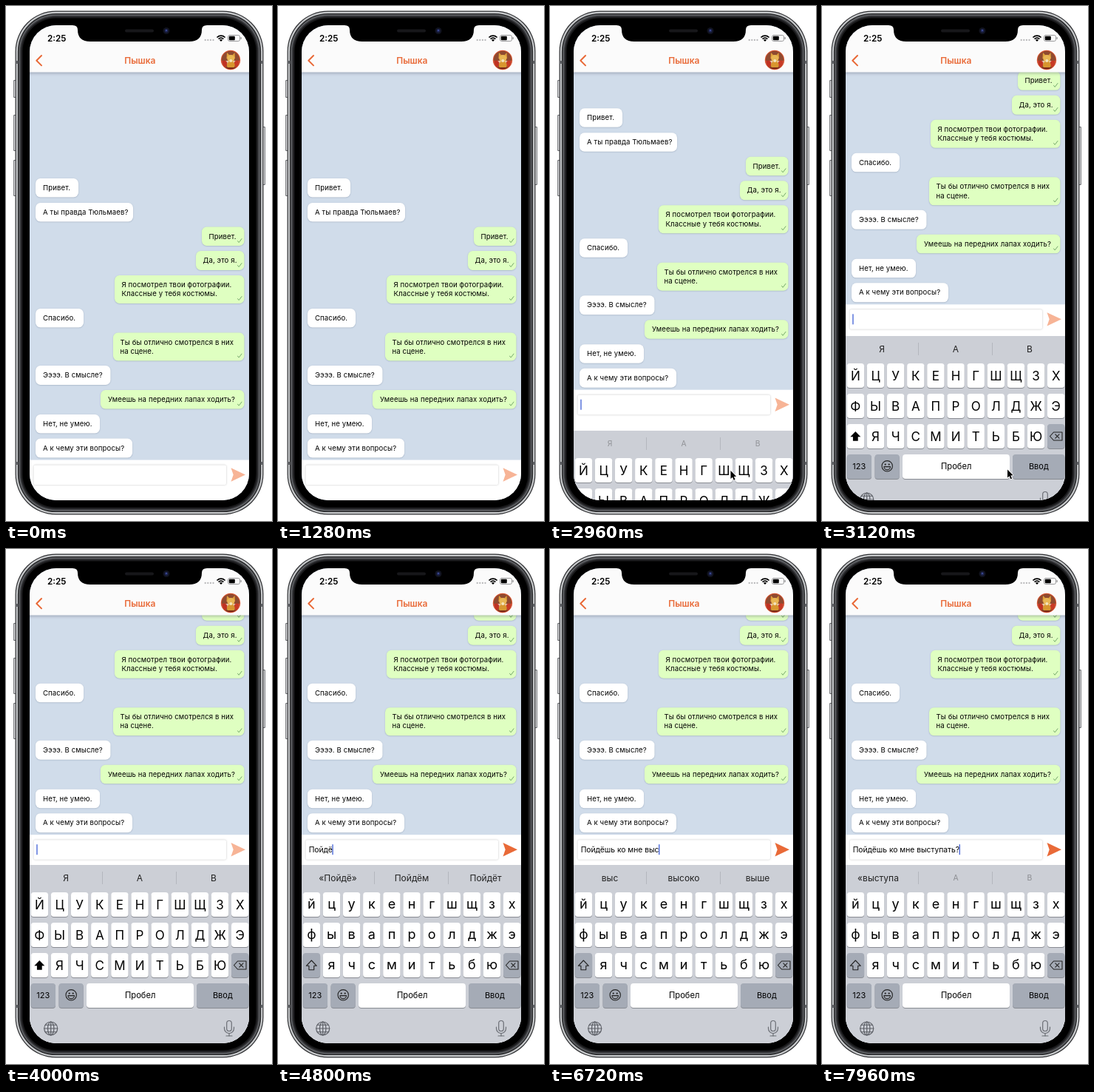
These frames come from a looping animation (360x696 px, 8000 ms). An HTML page with a canvas:

```html
<!DOCTYPE html>
<html lang="ru">
<head>
<meta charset="utf-8">
<title>Чат</title>
<style>
html, body { margin: 0; width: 100%; height: 100%; overflow: hidden; background: #fff; }
canvas { display: block; width: 360px; height: 696px; }
</style>
</head>
<body>
<canvas id="stage"></canvas>
<script>
const W = 360, H = 696, LOOP = 8000;
const canvas = document.getElementById('stage');
const c = canvas.getContext('2d');
const dpr = window.devicePixelRatio || 1;
canvas.width = W * dpr;
canvas.height = H * dpr;

const FONT = 'Inter, Roboto, sans-serif';
const ORANGE = '#e96a38', PALE = '#f7b496', INK = '#000';
const KEY_GRAY = '#a5abb6';

// x, y, width, height, text indent, lines, outgoing
const bubbles = [
  [40, 233, 58, 25.5, 10, ['Привет.']],
  [40, 266, 132, 25.5, 10, ['А ты правда Тюльмаев?']],
  [265, 298.5, 57.5, 25.5, 9.5, ['Привет.'], true],
  [257, 331, 65.5, 26, 9.5, ['Да, это я.'], true],
  [147, 364, 175.5, 38, 9.5, ['Я посмотрел твои фотографии.', 'Классные у тебя костюмы.'], true],
  [40, 409, 65, 25.5, 10, ['Спасибо.']],
  [145, 441.5, 177.5, 38, 9.5, ['Ты бы отлично смотрелся в них', 'на сцене.'], true],
  [40, 486, 101.5, 26, 10, ['Ээээ. В смысле?']],
  [128, 519, 194.5, 25.5, 10, ['Умеешь на передних лапах ходить?'], true],
  [40, 552, 87, 25.5, 10, ['Нет, не умею.']],
  [40, 584.5, 131, 26, 10, ['А к чему эти вопросы?']]
];

const MESSAGE = 'Пойдёшь ко мне выступать?';

// Suggestions for each count of typed letters
const hints = [
  'Я А В', 'По При Пока', 'По Пока Пойду', '«Пой» Пойду Пойми', '«Пойд» Пойду Пойдём',
  '«Пойдё» Пойдём Пойдёт', 'Пойдёш Пойдём Пойду', 'Пойдёшь Пойдем Идёшь',
  'в со на', 'к ко как', 'ко со в', 'мне мной дну', 'м мне мной', 'мн мне мной', 'мне мной меня',
  'и не в', 'в во вы', 'вы вас вам', 'выс высоко выше', '«выст» выставка высту',
  '«высту» выступ высоту', 'выступ выступы уступ', '«выступа выступать выступает',
  '«выступа выступать выступает', '«выступа выступать выступал', '«выступа А В'
].map(s => s.split(' '));

const clamp = v => Math.max(0, Math.min(1, v));
const ramp = (t, a, b) => clamp((t - a) / (b - a));
const smooth = v => v * v * (3 - 2 * v);

function box(x, y, w, h, r, fill) {
  c.beginPath();
  c.roundRect(x, y, w, h, r);
  c.fillStyle = fill;
  c.fill();
}

function disc(x, y, r, fill) {
  c.beginPath();
  c.arc(x, y, r, 0, Math.PI * 2);
  c.fillStyle = fill;
  c.fill();
}

function line(points, color, width, closed) {
  c.beginPath();
  points.forEach(([x, y]) => c.lineTo(x, y));
  if (closed) c.closePath();
  c.strokeStyle = color;
  c.lineWidth = width;
  c.stroke();
}

function shape(points, fill) {
  c.beginPath();
  points.forEach(([x, y]) => c.lineTo(x, y));
  c.closePath();
  c.fillStyle = fill;
  c.fill();
}

// y is the middle of the capital letters
function label(str, x, y, size, align = 'center', color = INK, weight = 400) {
  c.font = `${weight} ${size}px ${FONT}`;
  c.textAlign = align;
  c.fillStyle = color;
  c.fillText(str, x, y + size * 0.364);
}

function withShadow(color, blur, dy, draw) {
  c.save();
  c.shadowColor = color;
  c.shadowBlur = blur * dpr;
  c.shadowOffsetY = dy * dpr;
  draw();
  c.restore();
}

function drawBody() {
  [[10, 100, 24], [10, 147, 49], [10, 208, 49], [347, 163, 79]].forEach(([x, y, h]) => {
    box(x, y, 4, h, 1.2, '#6a6c70');
    box(x + 0.9, y + 1, 2.2, h - 2, 0.8, '#dcdddf');
  });
  const rim = [[0, '#2f3033'], [1.2, '#c9cbcd'], [3.4, '#2a2b2d'], [5, '#6a6c70'],
    [6.2, '#3a3b3e'], [8, '#1a1a1c'], [10, '#000']];
  rim.forEach(([d, color]) => box(12.5 + d, 6.5 + d, 336 - 2 * d, 681 - 2 * d, 55 - d, color));
  [[13, 74], [13, 616], [344.5, 74], [344.5, 616]].forEach(([x, y]) => {
    c.fillStyle = '#5f6165';
    c.fillRect(x, y, 3.5, 4);
  });
}

function drawNotch() {
  c.beginPath();
  c.moveTo(90, 25);
  c.lineTo(90, 26);
  c.quadraticCurveTo(97, 26, 97, 32);
  c.quadraticCurveTo(97, 48, 114, 48);
  c.lineTo(248, 48);
  c.quadraticCurveTo(265, 48, 265, 32);
  c.quadraticCurveTo(265, 26, 272, 26);
  c.lineTo(272, 25);
  c.closePath();
  c.fillStyle = '#000';
  c.fill();
  box(161, 31.5, 39, 4, 2, '#17171a');
  disc(217, 33.5, 4.5, '#11131f');
  disc(217, 33.5, 2.4, '#1e2552');
  disc(217, 33, 1, '#4353a0');
}

function drawStatus() {
  label('2:25', 56, 43.5, 11.7, 'left', '#000', 600);
  for (let i = 0; i < 4; i++) disc(269.7 + i * 3.6, 46, 1.15, '#b9b9bb');
  c.save();
  c.beginPath();
  c.moveTo(291, 48);
  c.lineTo(284.2, 41.2);
  c.lineTo(284.2, 36);
  c.lineTo(297.8, 36);
  c.lineTo(297.8, 41.2);
  c.closePath();
  c.clip();
  disc(291, 47.5, 2.4, '#000');
  [4.4, 7.4].forEach(r => {
    c.beginPath();
    c.arc(291, 47.5, r, Math.PI, 0);
    c.strokeStyle = '#000';
    c.lineWidth = 1.7;
    c.stroke();
  });
  c.restore();
  c.beginPath();
  c.roundRect(300.5, 39.5, 16, 8, 2.2);
  c.strokeStyle = '#8e8e90';
  c.lineWidth = 0.9;
  c.stroke();
  box(301.8, 40.8, 8, 5.4, 1, '#000');
  box(317.5, 42, 1.2, 3, 0.6, '#8e8e90');
}

function drawAvatar() {
  c.save();
  disc(304, 73, 13.2, '#dd5530');
  c.beginPath();
  c.arc(304, 73, 12.2, 0, Math.PI * 2);
  c.clip();
  c.fillStyle = '#8f4a30';
  c.fillRect(290, 59, 28, 28);
  c.fillStyle = '#e3c7ae';
  c.fillRect(290, 74, 28, 5);
  disc(295, 78, 4.5, '#c03222');
  disc(313, 78, 4.5, '#c83a26');
  shape([[298.5, 71], [299, 63], [303, 67], [306, 67], [309.5, 63], [310, 71]], '#e0a03a');
  disc(304.3, 71, 5, '#e8b654');
  disc(304.3, 80, 5.4, '#d8962f');
  disc(304.3, 74, 2, '#f4e3bd');
  c.fillStyle = '#7a2a1a';
  c.fillRect(290, 83, 28, 4);
  c.restore();
}

function drawHeader() {
  withShadow('rgba(60,70,90,.35)', 4, 1, () => {
    c.fillStyle = '#fbfbfb';
    c.fillRect(20, 20, 320, 69.5);
  });
  drawStatus();
  c.lineCap = c.lineJoin = 'round';
  line([[48, 67], [41.3, 73.7], [48, 80.4]], ORANGE, 2);
  label('Пышка', 181.3, 73.5, 12, 'center', ORANGE, 600);
  drawAvatar();
}

function drawChat(shift) {
  c.letterSpacing = '0.1px';
  bubbles.forEach(([x, y0, w, h, pad, lines, out]) => {
    const y = y0 - shift;
    if (y + h < 85) return;
    withShadow('rgba(90,110,135,.45)', 1.5, 0.5, () => box(x, y, w, h, 6.5, out ? '#dfffc1' : '#fff'));
    lines.forEach((s, i) => label(s, x + pad, y + 12.6 + i * 12.2, 9.6, 'left'));
    if (out) line([[313.5, y + h - 6.5], [315.2, y + h - 4.4], [319, y + h - 9.4]], '#74a86a', 1);
  });
  c.letterSpacing = '0px';
}

function typedCount(t) {
  if (t < 4200) return 0;
  if (t >= 7880) return 25;
  if (t < 5660) return Math.floor((t - 4200) / 146) + 1;
  return Math.min(24, 10 + Math.floor((t - 5514) / 150));
}

function drawInput(top, t, count) {
  c.fillStyle = '#fff';
  c.fillRect(32, top, 298, 670 - top);
  const mid = top + 20;
  withShadow('rgba(0,0,0,.25)', 2.5, 0, () => box(37.5, mid - 13, 260.5, 26.5, 2, '#fff'));
  const str = MESSAGE.slice(0, count);
  label(str, 41.7, mid + 0.2, 10.3, 'left');
  const dx = count ? c.measureText(str).width : 0;
  const blink = 1 - ramp(t, 3400, 3520) + ramp(t, 3920, 4000);
  c.globalAlpha = t < 2860 ? 0 : clamp(blink);
  c.fillStyle = '#3f5fd6';
  c.fillRect(41.3 + dx, mid - 7, 1.3, 14);
  c.globalAlpha = 1;
  shape([[304.5, mid - 9.2], [324, mid], [304.5, mid + 9.2], [307.7, mid]], count ? ORANGE : PALE);
}

function key(x, y, w, fill = '#fff') {
  box(x, y + 1, w, 33, 4, '#888b92');
  box(x, y, w, 33, 4, fill);
}

function drawHints(y, t, count) {
  const first = count === 0, last = count === 25;
  hints[count].forEach((s, i) => {
    let k = 1;
    if (first) k = ramp(t, 2890, 3110);
    if (last && i > 0) k = ramp(t, 7880, 8100);
    c.globalAlpha = k < 1 ? 0.15 + 0.6 * k : 1;
    label(s, 81 + i * 100 - (i === 0 && count > 21 ? 5 : 0), y + 17.7, 8 + 4 * Math.sqrt(k), 'center', '#222');
    c.globalAlpha = 1;
  });
  c.fillStyle = '#b4b7be';
  c.fillRect(130, y + 9, 1, 17);
  c.fillRect(230, y + 9, 1, 17);
}

function drawShift(y, upper) {
  const x = 45.3;
  key(33.7, y, 23.4, upper ? '#fff' : KEY_GRAY);
  const arrow = [[0, -7], [7, 0.3], [3.4, 0.3], [3.4, 5.8], [-3.4, 5.8], [-3.4, 0.3], [-7, 0.3]]
    .map(([a, b]) => [x + a, y + 17 + b]);
  if (upper) shape(arrow, '#000');
  else line(arrow, '#222', 1.1, true);
}

function drawDelete(y) {
  key(305, y, 23.4, KEY_GRAY);
  const m = y + 16.5;
  line([[308.5, m], [313.5, m - 5.5], [325, m - 5.5], [325, m + 5.5], [313.5, m + 5.5]], '#222', 1.1, true);
  line([[315.8, m - 2.6], [321, m + 2.6]], '#222', 1.1);
  line([[321, m - 2.6], [315.8, m + 2.6]], '#222', 1.1);
}

function drawEmoji(x, y) {
  c.strokeStyle = '#222';
  c.lineWidth = 1.1;
  c.beginPath();
  c.arc(x, y, 7.2, 0, Math.PI * 2);
  c.stroke();
  disc(x - 2.5, y - 2.2, 1.1, '#222');
  disc(x + 2.5, y - 2.2, 1.1, '#222');
  c.beginPath();
  c.arc(x, y + 0.8, 4.3, 0, Math.PI);
  c.closePath();
  c.stroke();
}

function drawGlobe(x, y) {
  c.strokeStyle = '#5c5f66';
  c.lineWidth = 1.2;
  [9, 4.2].forEach(rx => {
    c.beginPath();
    c.ellipse(x, y, rx, 9, 0, 0, Math.PI * 2);
    c.stroke();
  });
  line([[x, y - 9], [x, y + 9]], '#5c5f66', 1.2);
  line([[x - 9, y], [x + 9, y]], '#5c5f66', 1.2);
  [-4.8, 4.8].forEach(d => line([[x - 7.6, y + d], [x + 7.6, y + d]], '#5c5f66', 1.1));
}

function drawMic(x, y) {
  c.strokeStyle = '#6b6e75';
  c.lineWidth = 1.2;
  c.beginPath();
  c.roundRect(x - 3.3, y - 10.5, 6.6, 14, 3.3);
  c.stroke();
  c.beginPath();
  c.moveTo(x - 6.5, y - 2);
  c.arc(x, y, 6.5, Math.PI, 0, true);
  c.lineTo(x + 6.5, y - 2);
  c.stroke();
  line([[x, y + 6.5], [x, y + 10]], '#6b6e75', 1.2);
  line([[x - 4, y + 10], [x + 4, y + 10]], '#6b6e75', 1.2);
}

function drawKeyboard(top, t, count) {
  if (top > 668) return;
  c.fillStyle = '#cccfd6';
  c.fillRect(32, top, 298, 260);
  drawHints(top, t, count);
  const upper = count === 0;
  [['ЙЦУКЕНГШЩЗХ', 0], ['ФЫВАПРОЛДЖЭ', 0], ['ЯЧСМИТЬБЮ', 1]].forEach(([row, from], r) => {
    const y = top + 37 + r * 41;
    [...row].forEach((ch, i) => {
      const x = 33.7 + (i + from) * 27.13;
      key(x, y, 23.4);
      if (upper) label(ch, x + 11.7, y + 17, 17);
      else label(ch.toLowerCase(), x + 11.7, y + 15.8, 18);
    });
  });
  drawShift(top + 119, upper);
  drawDelete(top + 119);
  const y = top + 160, m = y + 15.8;
  key(33.7, y, 33.3, KEY_GRAY);
  label('123', 50.3, m, 11);
  key(71.5, y, 33.3, KEY_GRAY);
  drawEmoji(88.2, m);
  key(109, y, 145);
  label('Пробел', 181.7, m, 11.2);
  key(258, y, 70.5, KEY_GRAY);
  label('Ввод', 293.3, m, 11);
  drawGlobe(60.7, top + 221);
  drawMic(302, top + 221);
}

function drawPointer(t) {
  if (t < 2280 || t > 3500) return;
  const enter = smooth(ramp(t, 2280, 2680));
  const drift = smooth(ramp(t, 2980, 3110));
  const leave = smooth(ramp(t, 3140, 3460));
  const x = 256 - 11.5 * enter + 6.5 * drift + 8 * leave;
  const y = 672 - 44 * enter - 1.5 * drift + 46 * leave;
  const arrow = [[0, 0], [0, 11], [2.5, 8.7], [4.3, 12.8], [6.1, 12], [4.3, 8], [7.6, 7.8]]
    .map(([a, b]) => [x + a, y + b]);
  line(arrow, '#fff', 1.4, true);
  shape(arrow, '#000');
}

function draw(t) {
  c.setTransform(dpr, 0, 0, dpr, 0, 0);
  c.fillStyle = '#fff';
  c.fillRect(0, 0, W, H);
  drawBody();

  // Critically damped spring lifts the keyboard
  const u = Math.max(0, t - 2880) * 0.0176;
  const lift = 1 - (1 + u) * Math.exp(-u);
  const count = typedCount(t);

  c.save();
  c.beginPath();
  c.roundRect(32, 26, 297, 642, 36);
  c.clip();
  c.fillStyle = '#d0dcea';
  c.fillRect(32, 26, 298, 643);
  c.lineCap = c.lineJoin = 'round';
  drawChat(227.3 * lift);
  drawInput(613.5 - 227.3 * lift, t, count);
  drawKeyboard(679 - 252 * lift, t, count);
  drawHeader();
  drawPointer(t);
  c.restore();
  drawNotch();
}

const start = performance.now();
function tick() {
  draw((performance.now() - start) % LOOP);
  requestAnimationFrame(tick);
}
tick();
</script>
</body>
</html>
```
